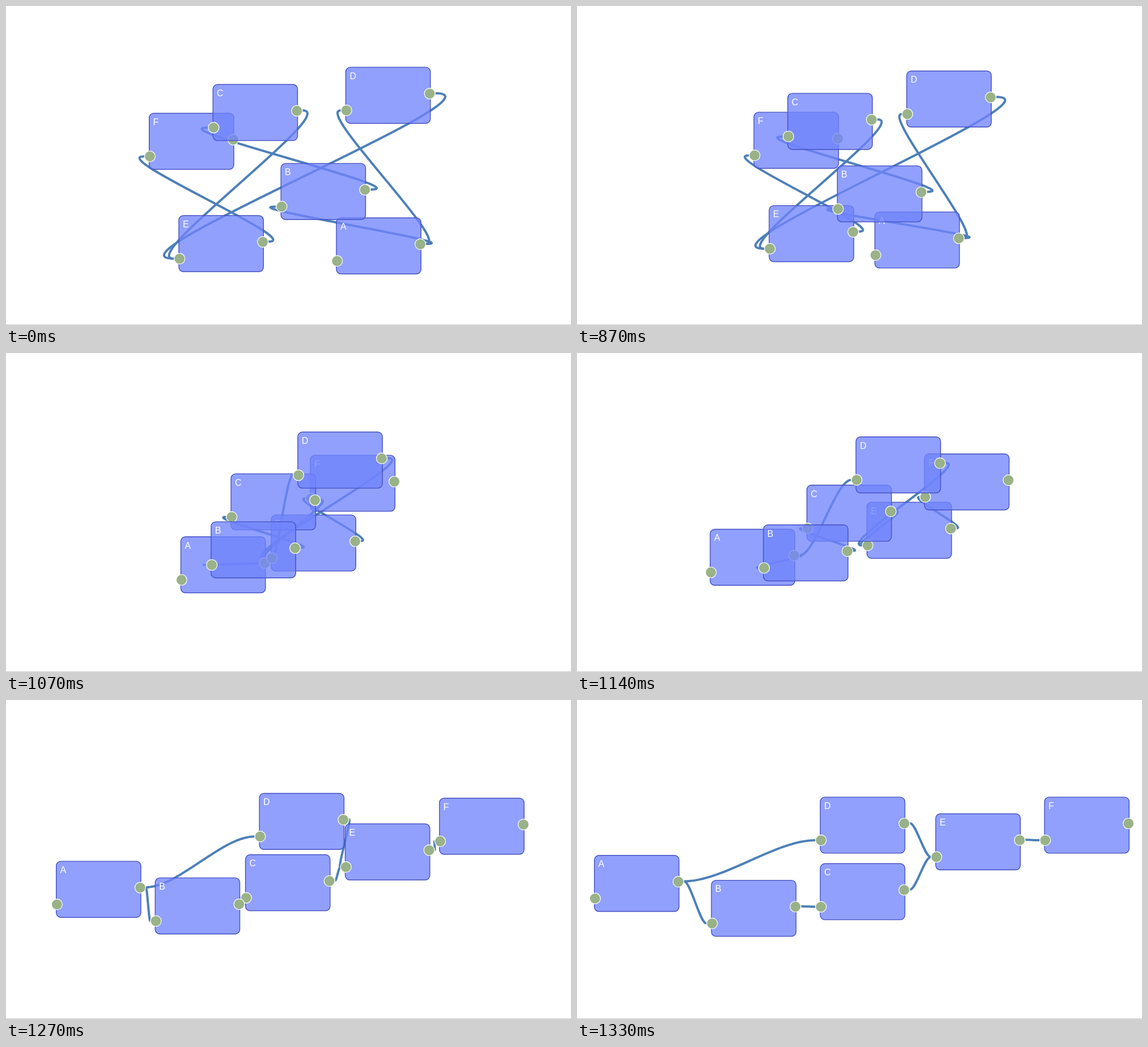
Recreate the animation shown at these times as an HTML page. Size 997x562 px, loop 2.6 s.

```html
<!DOCTYPE html>
<html lang="en">
<head>
<meta charset="utf-8">
<title>Graph layout</title>
<style>
  html, body { margin: 0; width: 100%; height: 100%; overflow: hidden; background: #fff; }
  svg { display: block; width: 997px; height: 562px; }
  .link { fill: none; stroke: #4d7fb8; stroke-width: 4; }
  .box { fill: rgb(112, 132, 253); fill-opacity: .77; stroke: #4450c4; stroke-width: 1.4; }
  .port { fill: #99b288; stroke: #fff; stroke-width: 1.2; }
  text { fill: #fff; font: 16px "Liberation Sans", Arial, sans-serif; }
</style>
</head>
<body>
<svg id="stage" viewBox="0 0 997 562"></svg>
<script>
const LOOP = 2600;
const STEPS = [
  [0, 0], [870, .104], [940, .23], [1000, .363], [1070, .497],
  [1140, .63], [1200, .762], [1270, .895], [1330, 1]
];

// Back to front: scattered x, y and then arranged x, y
const NODES = {
  A: [583, 373.2, 30.7, 273.7],
  E: [305, 369.2, 633, 200.5],
  F: [252.7, 189, 825, 171.1],
  C: [365.2, 138.3, 429.3, 288.3],
  B: [485.2, 277.4, 237.2, 317.6],
  D: [599.5, 107.9, 429.3, 171.1]
};
const LINKS = ["AB", "AD", "BC", "CE", "DE", "EF"];
const IN = { x: 1.2, y: 76 };
const OUT = { x: 148.2, y: 46.4 };
const GAP = 10;

const stage = document.getElementById("stage");

function add(parent, tag, attrs) {
  const el = document.createElementNS("http://www.w3.org/2000/svg", tag);
  for (const key in attrs) el.setAttribute(key, attrs[key]);
  return parent.appendChild(el);
}

const paths = LINKS.map(() => add(stage, "path", { class: "link" }));
const groups = {};
for (const name in NODES) {
  const g = groups[name] = add(stage, "g", {});
  add(g, "rect", { class: "box", width: 149.3, height: 98.8, rx: 8 });
  add(g, "text", { x: 6.9, y: 20.8 }).textContent = name;
  for (const p of [IN, OUT]) add(g, "circle", { class: "port", cx: p.x, cy: p.y, r: 9.5 });
}
add(stage, "rect", { y: 561, width: 997, height: 1, fill: "#ccc" });

function place(name, p) {
  const [x0, y0, x1, y1] = NODES[name];
  return { x: x0 + (x1 - x0) * p, y: y0 + (y1 - y0) * p };
}

function curve(from, to) {
  const x0 = from.x + OUT.x + GAP, y0 = from.y + OUT.y - .6;
  const x1 = to.x + IN.x - GAP, y1 = to.y + IN.y;
  const pull = Math.abs(x1 - x0) * .3;
  return `M${x0} ${y0}C${x0 + pull} ${y0} ${x1 - pull} ${y1} ${x1} ${y1}`;
}

function draw(p) {
  const at = {};
  for (const name in NODES) {
    at[name] = place(name, p);
    groups[name].setAttribute("transform", `translate(${at[name].x} ${at[name].y})`);
  }
  LINKS.forEach(([a, b], i) => paths[i].setAttribute("d", curve(at[a], at[b])));
}

const start = performance.now();
function tick() {
  const t = (performance.now() - start) % LOOP;
  let p = 0;
  for (const [time, value] of STEPS) if (t >= time) p = value;
  draw(p);
  requestAnimationFrame(tick);
}
tick();
</script>
</body>
</html>
```
